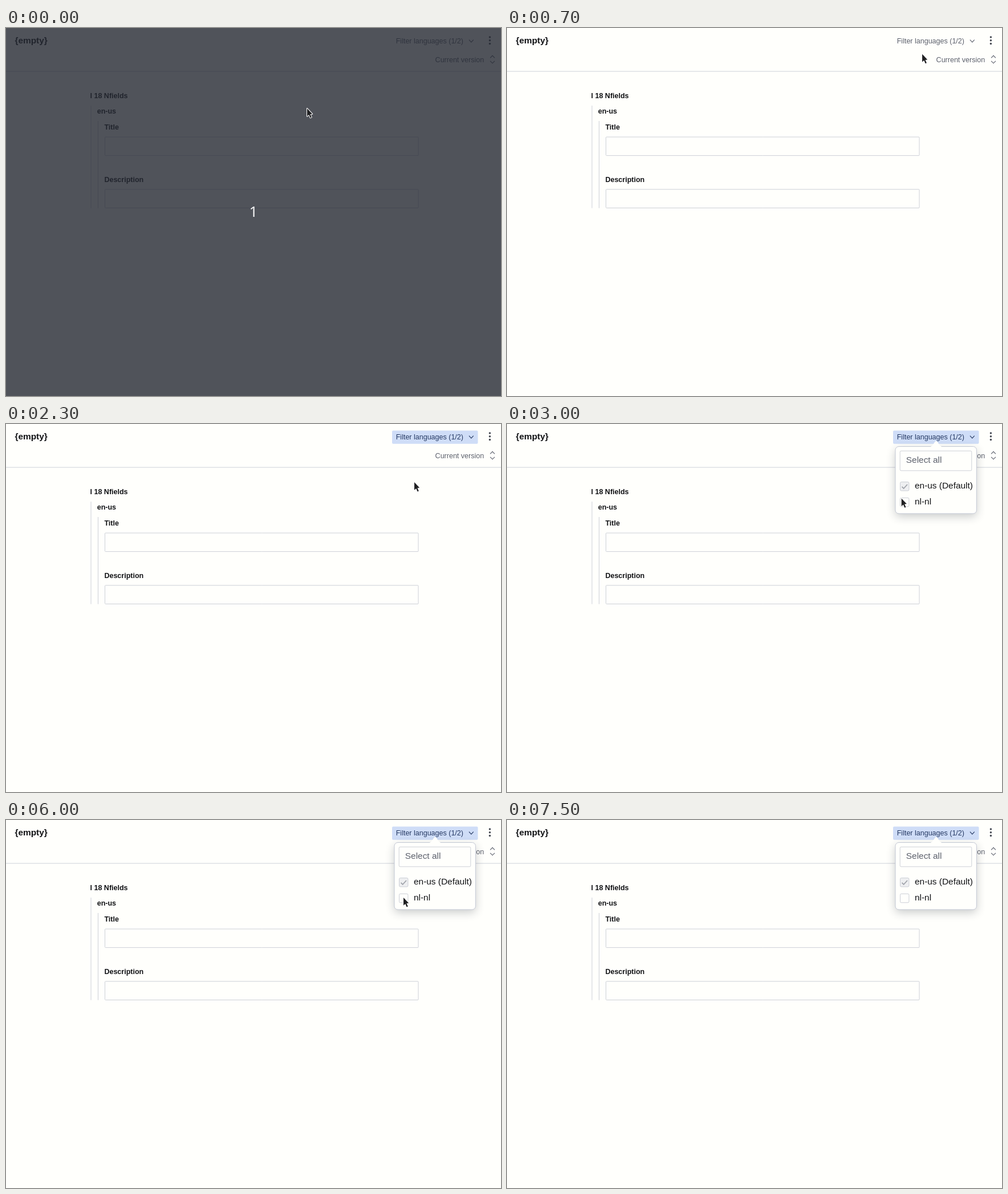
Write an HTML page with a canvas that moves like this. It is 868x645 px and loops after 8300 ms.

```html
<!DOCTYPE html>
<html lang="en">
<head>
<meta charset="utf-8">
<title>Language filter</title>
<style>
  html, body { margin: 0; width: 100%; height: 100%; overflow: hidden; background: #fffffc; }
  canvas { display: block; width: 868px; height: 645px; }
</style>
</head>
<body>
<canvas id="stage"></canvas>
<script>
const W = 868, H = 645, LOOP = 8300, TICK = 100;
const SMALL = 12.53, BIG = 15.42;
const SANS = '"Liberation Sans", Arial, sans-serif';
const PAPER = '#fffffc', INK = '#111215', GREY = '#5c606c', LINE = '#cdd0d8';

const canvas = document.getElementById('stage');
const ctx = canvas.getContext('2d');
const dpr = window.devicePixelRatio || 1;
canvas.width = W * dpr;
canvas.height = H * dpr;
ctx.scale(dpr, dpr);

// Pointer moves: start time, end time, target x, target y
const START = [528, 141];
const MOVES = [
  [100, 400, 714, 88],
  [500, 800, 733, 31],
  [1800, 2300, 716, 102],
  [2300, 2400, 717, 103],
  [2700, 3100, 687, 135.5],
  [3600, 3700, 697, 136],
  [6600, 6800, 511, 146],
  [6900, 7200, 709.5, 143],
  [7300, 7400, 98, 15]
];
const POINTER_GONE = 7500;

function pointerAt(t) {
  let [x, y] = START;
  for (const [from, to, tx, ty] of MOVES) {
    const p = Math.min(1, Math.max(0, (t - from) / (to - from)));
    const e = p * p * (3 - 2 * p);
    x += (tx - x) * e;
    y += (ty - y) * e;
  }
  return [x, y];
}

function text(str, x, y, color = INK, size = SMALL, weight = 'normal', family = SANS) {
  ctx.font = `${weight} ${size}px ${family}`;
  ctx.fillStyle = color;
  ctx.fillText(str, x, y);
}

const label = (str, x, y) => text(str, x, y, INK, SMALL, 'bold');

function box(x, y, w, h, r, fill, stroke) {
  ctx.beginPath();
  ctx.roundRect(x, y, w, h, r);
  if (fill) { ctx.fillStyle = fill; ctx.fill(); }
  if (stroke) { ctx.strokeStyle = stroke; ctx.lineWidth = 1; ctx.stroke(); }
}

function path(points, color, width) {
  ctx.beginPath();
  points.forEach(([x, y]) => ctx.lineTo(x, y));
  ctx.strokeStyle = color;
  ctx.lineWidth = width;
  ctx.stroke();
}

const chevron = (x, y, dy, color) =>
  path([[x - 3.9, y], [x, y + dy], [x + 3.9, y]], color, 1.15);

function header(count, state) {
  text('{empty}', 15.4, 27, INK, BIG, 'bold');
  const fill = { hover: '#f0f0f2', open: '#cfddf7' }[state];
  const color = { idle: GREY, hover: '#484c56', open: '#253963' }[state];
  if (fill) box(677, 11.6, 150.5, 23.2, 2, fill);
  text(`Filter languages (${count}/2)`, 683.7, 26.8, color);
  chevron(815.8, 20.6, 4.2, color);

  ctx.fillStyle = '#454952';
  for (let i = 0; i < 3; i++) {
    ctx.beginPath();
    ctx.arc(848.4, 16 + i * 5.8, 1.75, 0, 7);
    ctx.fill();
  }
  text('Current version', 752.6, 59.5, GREY);
  chevron(853, 52.4, -4, GREY);
  chevron(853, 57.8, 4, GREY);
  path([[0, 76], [W, 76]], LINE, 1);
}

function field(name, y) {
  label(name, 172.4, y);
  box(173.5, y + 13, 549.5, 32.6, 1, PAPER, LINE);
}

function language(name, y) {
  label(name, 159.7, y);
  path([[161.5, y + 13], [161.5, y + 165.7]], LINE, 1);
  field('Title', y + 28);
  field('Description', y + 119.8);
}

function form(both) {
  label('I 18 Nfields', 147.5, 122.6);
  path([[149, 136], [149, both ? 527 : 315.7]], LINE, 1);
  language('en-us', 150);
  if (both) language('nl-nl', 361.4);
}

function checkbox(y, fill, tick) {
  box(689.5, y, 15.4, 15.4, 2, fill, '#cbced6');
  if (tick) path([[692.6, y + 8.2], [695.6, y + 11.4], [702, y + 4.4]], tick, 1.8);
}

function popup(both) {
  ctx.save();
  ctx.shadowColor = 'rgba(30, 36, 52, .24)';
  ctx.shadowBlur = 16 * dpr;
  ctx.shadowOffsetY = 5 * dpr;
  box(681, 39.5, 142.4, 117.5, 6, PAPER);
  ctx.restore();
  box(681, 39.5, 142.4, 117.5, 6, PAPER, '#c3c8d4');

  ctx.beginPath();
  ctx.moveTo(742, 40.2);
  ctx.quadraticCurveTo(745, 39.2, 747, 36);
  ctx.lineTo(751, 30.6);
  ctx.quadraticCurveTo(752.5, 29, 754, 30.6);
  ctx.lineTo(758, 36);
  ctx.quadraticCurveTo(760, 39.2, 763, 40.2);
  ctx.fillStyle = PAPER;
  ctx.fill();

  box(689.2, 47.2, 125.6, 34.6, 2, PAPER, LINE);
  text(both ? 'Select none' : 'Select all', 699.8, 68, GREY, BIG);
  checkbox(101.6, '#eeeff1', '#a0a3aa');
  text('en-us (Default)', 715, 113, INK, BIG);
  checkbox(129.4, PAPER, both && INK);
  text('nl-nl', 715, 140.8, INK, BIG);
}

function tooltip() {
  box(734, 52.6, 150, 40.4, 5, 'rgba(0, 0, 0, .8)');
  text('Displaying fields only', 746, 77, '#fff', 12.5, 'normal', '"Noto Sans", "Open Sans", sans-serif');
}

function countdown() {
  ctx.fillStyle = 'rgba(37, 41, 50, .8)';
  ctx.fillRect(0, 0, W, H);
  ctx.textAlign = 'center';
  text('1', 434, 330.5, '#fff', 26, 'normal', '"Open Sans", "Noto Sans", sans-serif');
  ctx.textAlign = 'left';
}

function pointer(x, y) {
  ctx.save();
  ctx.translate(x, y);
  ctx.beginPath();
  [[0, 0], [0, 13.8], [3.2, 10.9], [5.6, 16.4], [7.8, 15.4], [5.4, 10.1], [9.2, 9.7]]
    .forEach(([px, py]) => ctx.lineTo(px, py));
  ctx.closePath();
  ctx.lineJoin = 'round';
  ctx.lineWidth = 2;
  ctx.strokeStyle = '#fff';
  ctx.stroke();
  ctx.fillStyle = '#202022';
  ctx.fill();
  ctx.restore();
}

function draw(now) {
  const t = Math.floor((now % LOOP) / TICK) * TICK;
  const [x, y] = pointerAt(t);
  const both = t >= 3900 && t < 6000;
  const over = x > 677 && x < 827 && y > 12 && y < 35;
  const state = t >= 1500 ? 'open' : over ? 'hover' : 'idle';

  ctx.fillStyle = PAPER;
  ctx.fillRect(0, 0, W, H);
  header(both ? 2 : 1, state);
  form(both);
  if (t >= 2400) popup(both);
  if (t >= 1300 && t < 1500) tooltip();
  if (t < 100) countdown();
  if (t < POINTER_GONE) pointer(x, y);
}

const begin = performance.now();
function loop() {
  draw(performance.now() - begin);
  requestAnimationFrame(loop);
}
loop();
</script>
</body>
</html>
```
